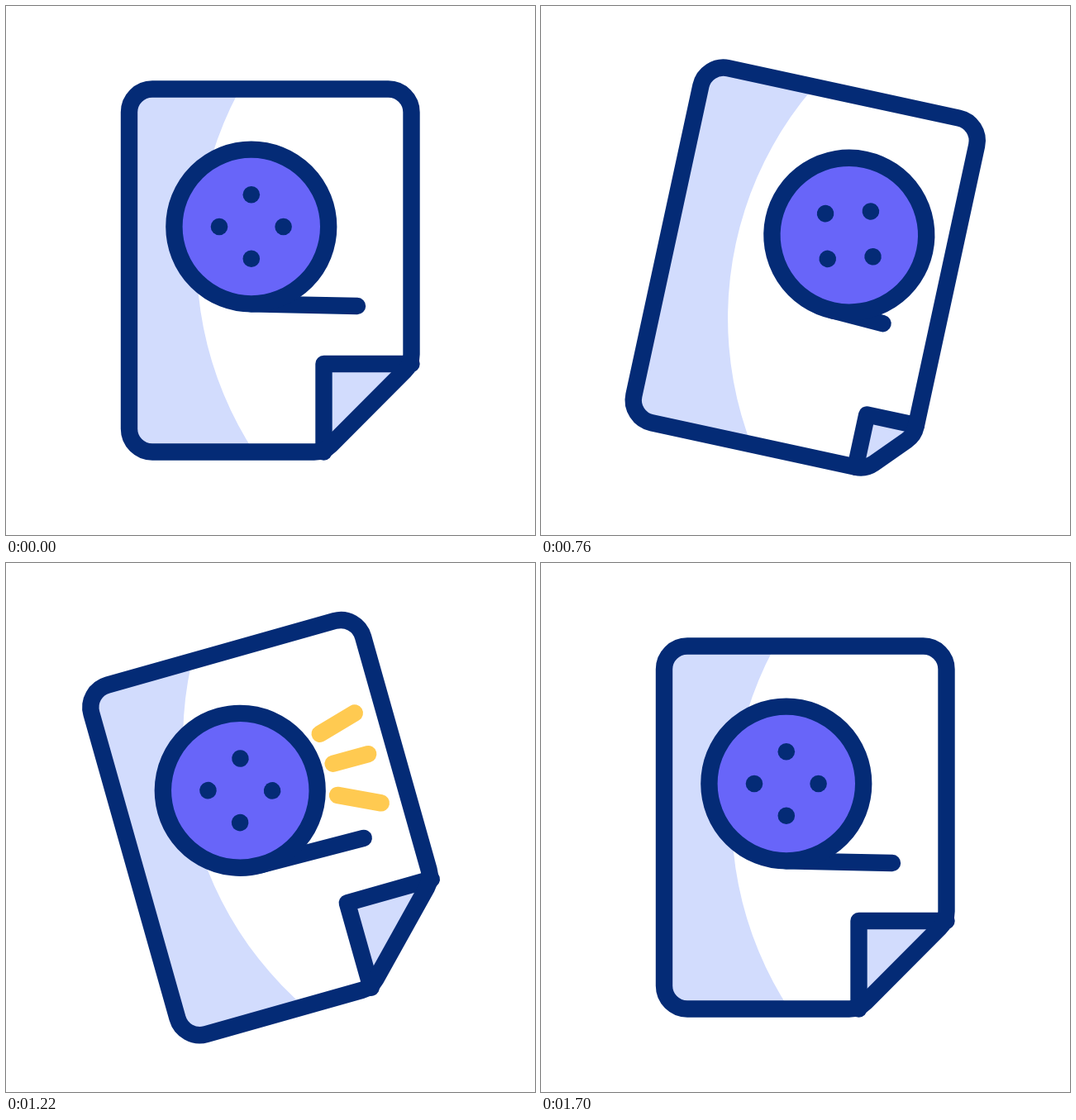
An HTML page with a canvas that plays this animation: 640x640 px, repeating every 2.08 s.

```html
<!DOCTYPE html>
<html lang="en">
<head>
<meta charset="utf-8">
<title>Film document</title>
<style>
  html, body { margin: 0; width: 100%; height: 100%; overflow: hidden; background: #fff; }
  canvas { display: block; width: 640px; height: 640px; }
</style>
</head>
<body>
<canvas id="stage" width="640" height="640"></canvas>
<script>
const ctx = document.getElementById('stage').getContext('2d');
const NAVY = '#042b76', PALE = '#d2dcfd', PURPLE = '#6865f9', YELLOW = '#ffca51';
const LOOP = 2080, LINE = 20.4;

// Page edges, relative to the centre of the stage
const LEFT = -171, TOP = -219.5, RIGHT = 170.5, BOTTOM = 219.5, CORNER = 28;
const REEL = { x: -23.2, y: -53, r: 93.4 };

const smooth = u => u * u * (3 - 2 * u);
const easeOut = u => 1 - (1 - u) ** 3;

// Value at time t for keys [time, value], eased between each pair
function track(t, keys, ease = smooth) {
  if (t <= keys[0][0]) return keys[0][1];
  for (let i = 1; i < keys.length; i++) {
    const [t0, v0] = keys[i - 1], [t1, v1] = keys[i];
    if (t < t1) return v0 + (v1 - v0) * ease((t - t0) / (t1 - t0));
  }
  return keys[keys.length - 1][1];
}

function stroke(color = NAVY) {
  ctx.strokeStyle = color;
  ctx.stroke();
}

function fill(color) {
  ctx.fillStyle = color;
  ctx.fill();
}

function line(points) {
  ctx.beginPath();
  points.forEach(([x, y]) => ctx.lineTo(x, y));
}

function disc(x, y, r) {
  ctx.beginPath();
  ctx.arc(x, y, r, 0, Math.PI * 2);
}

function pagePath(foldX, foldY, slack) {
  const corners = [
    [RIGHT, TOP], [RIGHT, foldY + slack], [foldX + slack, BOTTOM],
    [LEFT, BOTTOM], [LEFT, TOP]
  ];
  ctx.beginPath();
  ctx.moveTo(0, TOP);
  corners.forEach(([x, y], i) => {
    const [nx, ny] = corners[i + 1] || [0, TOP];
    ctx.arcTo(x, y, nx, ny, CORNER);
  });
  ctx.closePath();
}

function drawPage(uncurl) {
  const foldX = 64.5 + 47.4 * uncurl, foldY = 113 + 44 * uncurl, slack = 13 * uncurl;
  pagePath(foldX, foldY, slack);
  fill('#fff');

  // Shade on the left, cut away by a large circle
  ctx.save();
  ctx.clip();
  ctx.beginPath();
  ctx.rect(-260, -260, 520, 520);
  ctx.arc(338.7, -14.2, 428, 0, Math.PI * 2);
  ctx.fillStyle = PALE;
  ctx.fill('evenodd');
  ctx.beginPath();
  ctx.rect(0, -260, 260, 520);
  fill('#fff');
  ctx.restore();

  line([[foldX, foldY], [RIGHT, foldY], [RIGHT, foldY + slack], [foldX + slack, BOTTOM], [foldX, BOTTOM]]);
  fill(PALE);
  line([[RIGHT, foldY], [foldX, foldY], [foldX, BOTTOM]]);
  stroke();
  pagePath(foldX, foldY, slack);
  stroke();
}

function drawReel(shift, turn) {
  const x = REEL.x + shift;
  line([[x, REEL.y + REEL.r], [105, 43]]);
  stroke();
  disc(x, REEL.y, REEL.r);
  fill(PURPLE);
  stroke();
  for (let i = 0; i < 4; i++) {
    const a = (turn + i * 90) * Math.PI / 180;
    disc(x + 38.8 * Math.cos(a), REEL.y + 38.8 * Math.sin(a), 10.3);
    fill(NAVY);
  }
}

function drawRays(grow) {
  if (grow < 0.005) return;
  const rays = [[88.2, -92.7, 47.7, -13], [93.8, -53.8, 44.4, 0.4], [88.6, -15.6, 48.5, 23.6]];
  for (const [x, y, dx, dy] of rays) {
    line([[x, y], [x + dx * grow, y + dy * grow]]);
    stroke(YELLOW);
  }
}

function draw(t) {
  const tilt = track(t, [[108, 0], [665, 15.4], [1150, -16.5], [1700, 0]]);
  const shift = track(t, [[100, 0], [468, 66], [750, 66], [1050, 0]]);
  const turn = t < 760
    ? track(t, [[100, 0], [450, 120]])
    : track(t, [[760, 120], [1700, 0]], easeOut);
  const uncurl = track(t, [[100, 0], [468, 1], [698, 1], [1148, 0]]);
  const grow = track(t, [[800, 0], [1060, 1], [1200, 1], [1640, 0]]);

  ctx.setTransform(1, 0, 0, 1, 0, 0);
  ctx.fillStyle = '#fff';
  ctx.fillRect(0, 0, 640, 640);
  ctx.translate(320, 320);
  ctx.rotate(tilt * Math.PI / 180);
  ctx.lineWidth = LINE;
  ctx.lineCap = ctx.lineJoin = 'round';
  drawPage(uncurl);
  drawRays(grow);
  drawReel(shift, turn);
}

let start;
function tick(now) {
  start ??= now;
  draw((now - start) % LOOP);
  requestAnimationFrame(tick);
}
draw(0);
requestAnimationFrame(tick);
</script>
</body>
</html>
```
